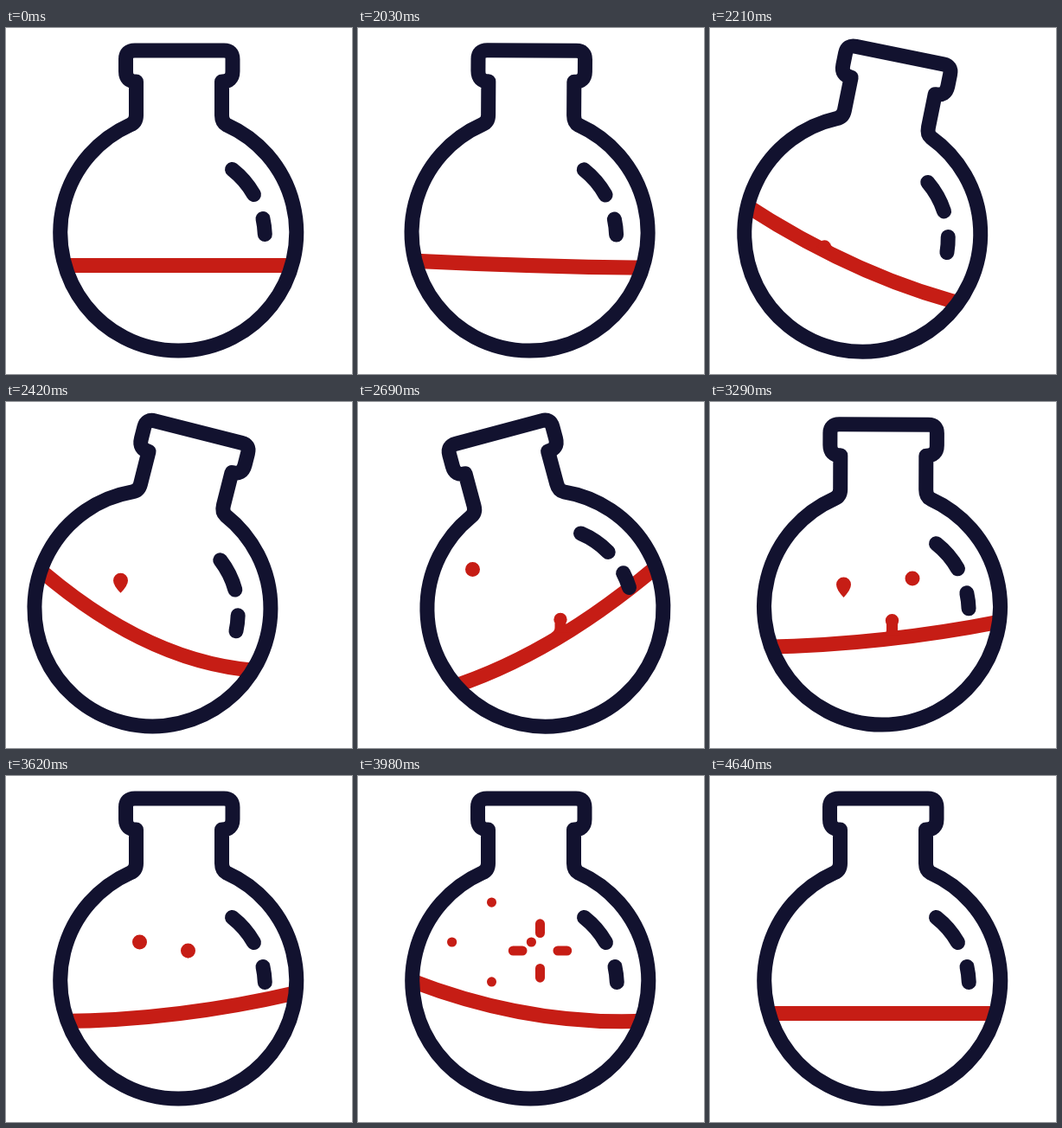
These frames come from a looping animation (400 by 400 pixels, 4.67 s). An HTML page:

```html
<!DOCTYPE html>
<html lang="en">
<head>
<meta charset="utf-8">
<title>Flask</title>
<style>
  html, body { margin: 0; width: 100%; height: 100%; overflow: hidden; background: #fff; }
  svg { display: block; width: 100vw; height: 100vh; }
  path { fill: none; stroke-width: 17; stroke-linecap: round; stroke-linejoin: round; }
  #flask path { stroke: #12122f; }
  #liquid, #rays { stroke: #c61d15; }
  #rays { stroke-width: 11; }
  #drops { fill: #c61d15; }
</style>
</head>
<body>
<svg viewBox="0 0 400 400">
  <clipPath id="bowl"><circle cx="199.3" cy="236.8" r="136"/></clipPath>
  <g id="inside" clip-path="url(#bowl)"><path id="liquid"/></g>
  <path id="drops"/>
  <path id="rays"/>
  <g id="flask">
    <path d="M150.5 62V101Q150.5 109 143.5 112A136.5 136.5 0 1 0 255 112Q249.5 109 249.5 101V62Q262 62 262 50V36Q262 26 252 26H149Q138.5 26 138.5 36V50Q138.5 62 150.5 62Z"/>
    <path d="M261.5 163.5A98 98 0 0 1 286.5 192.5M297 220.5A98 98 0 0 1 299.3 238.5"/>
  </g>
</svg>
<script>
const LOOP = 4670, START = 2025;
const CX = 199.3, CY = 236.8, LEVEL = 274.5, REACH = 145;
const RISE = 400, BURST = 690, GONE = 960, SPREAD = 46;

const drops = [
  { x: 132.5, top: 193.5, start: 2195 },
  { x: 234, top: 204, start: 2628 },
  { x: 154.5, top: 192, start: 3078 },
  { x: 210.5, top: 202, start: 3228 }
];

const $ = id => document.getElementById(id);
const clamp = v => Math.min(1, Math.max(0, v));
const outQuad = u => 1 - (1 - u) ** 2;
const outCubic = u => 1 - (1 - clamp(u)) ** 3;

// Swings from 0 through evenly spaced peaks with sine easing, then holds the last
function swing(t, start, half, ...peaks) {
  if (t < Math.max(start, START)) return 0;
  const n = Math.min(Math.floor((t - start) / half), peaks.length - 1);
  const u = clamp((t - start) / half - n);
  const from = n ? peaks[n - 1] : 0;
  return from + (peaks[n] - from) * (1 - Math.cos(Math.PI * u)) / 2;
}

const shiftAt = t => swing(t, 2000, 350, -35, 17.3, -1, 0);
const angleAt = t => swing(t, 2000, 350, 17.4, -15.1, 0.8, 0);
const bendAt = t => swing(t, 1965, 500, -0.0016, -0.0004, -0.0003, -0.0008, 0);
// A quick slosh, then a slow settling
const tiltAt = t => swing(t, 1980, 356, 0.607, -0.566, 0.34, -0.24) + swing(t, 3404, 600, 0.41, 0.24);

const disc = (x, y, r) =>
  `M${x - r} ${y}a${r} ${r} 0 1 0 ${2 * r} 0a${r} ${r} 0 1 0 ${-2 * r} 0Z`;

function dropPath({ x, top }, age, surface) {
  const u = clamp(age / RISE);
  const y = surface + (top - surface) * outQuad(u);
  const r = Math.min(8.5, 7.3 + 2.5 * u);
  let d = disc(x, y, r);
  if (u < 0.35) {
    const w = 6.5 * Math.min(1, (0.35 - u) / 0.17);
    const foot = Math.max(surface - 4, y);
    d += `M${x - w} ${y}V${foot - 6}Q${x - w} ${foot - 2} ${x - w - 4} ${foot}` +
         `H${x + w + 4}Q${x + w} ${foot - 2} ${x + w} ${foot - 6}V${y}Z`;
  } else if (u < 1) {
    const tip = y + r + 6.5 * (1 - u) / 0.47;
    d += `M${x - r} ${y}Q${x - r} ${y + r * 0.7} ${x} ${tip}Q${x + r} ${y + r * 0.7} ${x + r} ${y}Z`;
  }
  return d;
}

function rayPath({ x, top }, age) {
  const head = SPREAD * outCubic(age / 200);
  const tail = Math.min(head - 0.01, SPREAD * outCubic((age - 22) / 230));
  return [[1, 0], [-1, 0], [0, 1], [0, -1]].map(([i, j]) =>
    `M${x + i * tail} ${top + j * tail}L${x + i * head} ${top + j * head}`).join('');
}

function draw() {
  const t = performance.now() % LOOP;
  const dx = shiftAt(t), angle = angleAt(t), tilt = tiltAt(t), bend = bendAt(t);
  const dy = 0.009 * angle * angle;
  const mid = LEVEL + 14 * tilt * tilt;
  const level = x => mid + tilt * x + bend * x * x;

  $('flask').setAttribute('transform', `translate(${dx} ${dy}) rotate(${angle} ${CX} ${CY})`);
  $('inside').setAttribute('transform', `translate(${dx} ${dy})`);
  $('liquid').setAttribute('d', `M${CX - REACH} ${level(-REACH)}` +
    `Q${CX} ${mid - bend * REACH * REACH} ${CX + REACH} ${level(REACH)}`);

  let blobs = '', rays = '';
  for (const drop of drops) {
    const age = t - drop.start;
    if (age < 0 || age >= GONE) continue;
    if (age < BURST) blobs += dropPath(drop, age, level(drop.x - CX - dx) + dy);
    else rays += rayPath(drop, age - BURST);
  }
  $('drops').setAttribute('d', blobs);
  $('rays').setAttribute('d', rays);
  requestAnimationFrame(draw);
}
draw();
</script>
</body>
</html>
```
